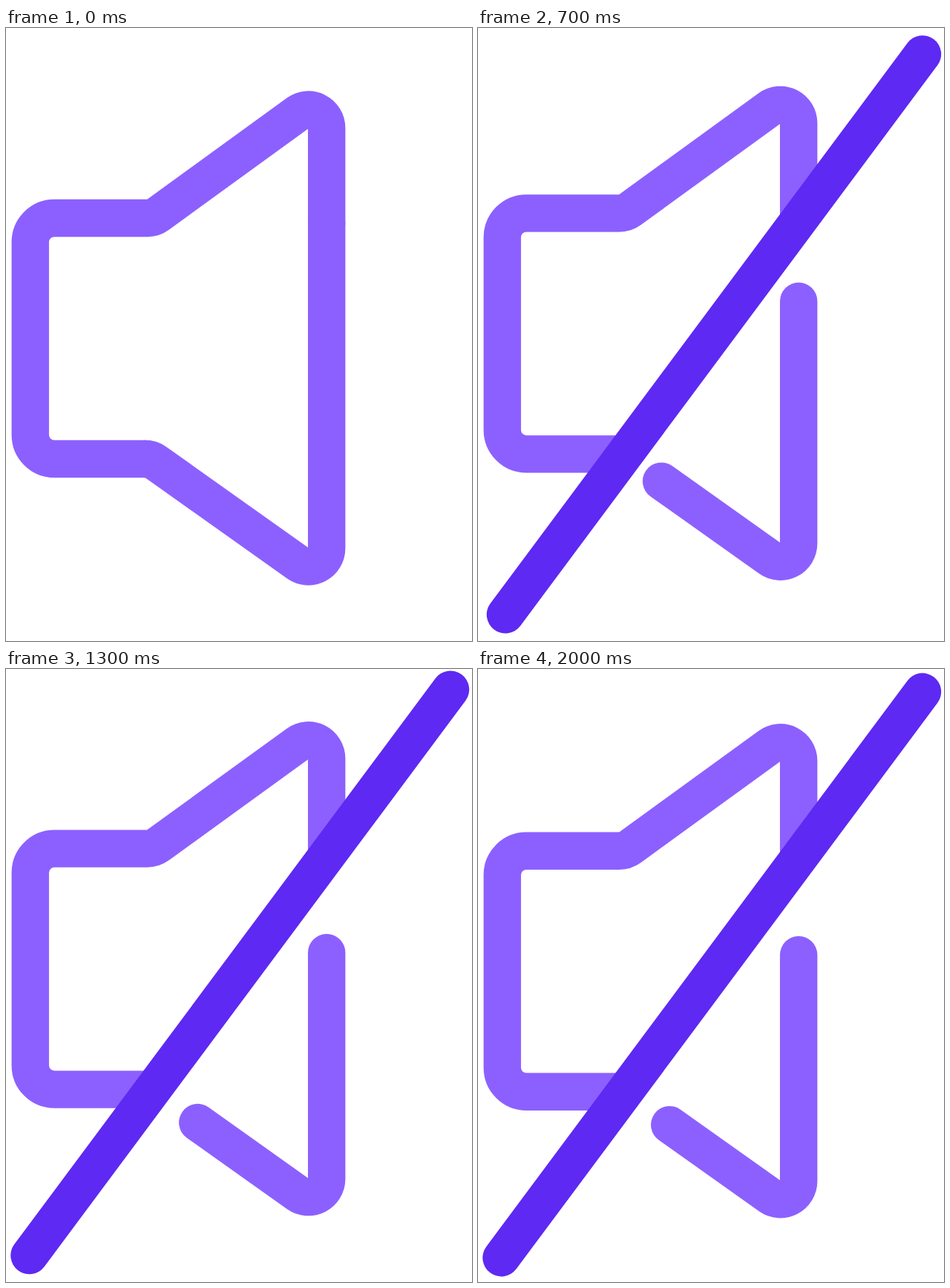
Recreate the animation shown at these times as an HTML page. Size 639x840 px, loop 2.03 s.

```html
<!DOCTYPE html>
<html lang="en">
<head>
<meta charset="utf-8">
<title>Mute icon</title>
<style>
  html, body { margin: 0; width: 100%; height: 100%; overflow: hidden; background: #fff; }
  svg { display: block; width: 639px; height: 840px; }
  g { fill: none; stroke-width: 51.3; stroke-linecap: round; stroke-linejoin: round; }
  .speaker { stroke: #8c60ff; }
  .slash { stroke: #5e29f2; }
</style>
</head>
<body>
<svg viewBox="0 0 639 840">
  <g id="icon">
    <path class="speaker" d="M439.7 268V137A25 25 0 0 0 400 116.8L208.4 255.7A25 25 0 0 1 193.7 260.5H66.3A33 33 0 0 0 33.3 293.5V557.5A33 33 0 0 0 66.3 590.5H191"/>
    <path class="speaker" id="corner" d="M439.7 268V713A25 25 0 0 1 400.2 733.4L205.4 595.1A25 25 0 0 0 190.9 590.5"/>
    <line class="slash" id="slash" x1="609.5" y1="42.5"/>
  </g>
</svg>
<script>
  const LOOP = 2030;
  const icon = document.getElementById('icon');
  const corner = document.getElementById('corner');
  const slash = document.getElementById('slash');
  const length = corner.getTotalLength();
  const from = { x: 609.5, y: 42.5 };
  const to = { x: 32, y: 818 };

  // cubic-bezier(.381, 0, .224, 1), solved by bisection
  function ease(x) {
    if (x <= 0) return 0;
    if (x >= 1) return 1;
    let lo = 0, hi = 1, s;
    for (let i = 0; i < 24; i++) {
      s = (lo + hi) / 2;
      const at = 3 * s * (1 - s) * (0.381 * (1 - s) + 0.224 * s) + s ** 3;
      if (at < x) lo = s; else hi = s;
    }
    return s * s * (3 - 2 * s);
  }

  // The picture advances at 0 and 30 ms of every 100 ms.
  const step = t => Math.floor(t / 100) * 100 + (t % 100 >= 30 ? 30 : 0);

  function draw(t) {
    const lift = -7.5 * (1 - Math.cos(Math.PI * t / 1500));
    icon.setAttribute('transform', `translate(0 ${lift.toFixed(3)})`);

    const reach = ease(t / 800);
    slash.setAttribute('visibility', reach > 0 ? 'visible' : 'hidden');
    slash.setAttribute('x2', from.x + (to.x - from.x) * reach);
    slash.setAttribute('y2', from.y + (to.y - from.y) * reach);

    // Both ends of the lower corner shrink away from the slash.
    const gap = ease((t - 43) / 1166);
    const head = 135 * gap, tail = 86 * gap;
    corner.setAttribute('stroke-dasharray', `${length - head - tail} ${length}`);
    corner.setAttribute('stroke-dashoffset', -head);
  }

  const start = performance.now();
  function tick() {
    draw(step((performance.now() - start) % LOOP));
    requestAnimationFrame(tick);
  }
  tick();
</script>
</body>
</html>
```
